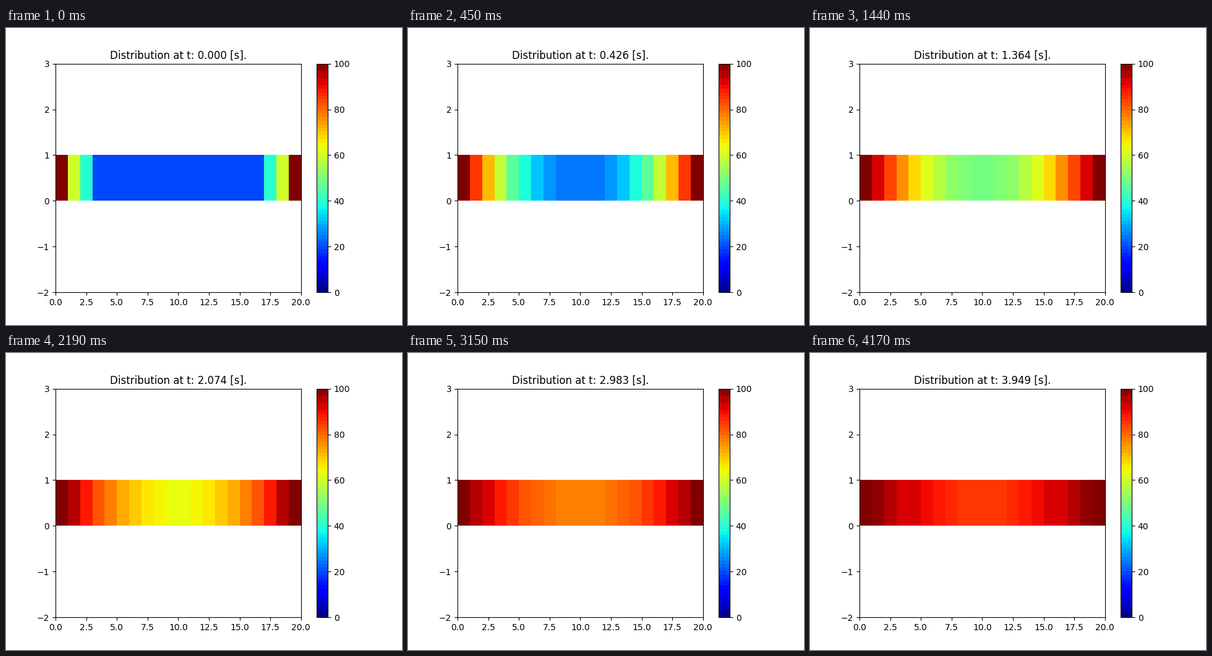
Recreate the animation shown at these times as a matplotlib script. Size 640x480 px, loop 4200 ms.

```python
import matplotlib.pyplot as plt
import numpy as np
from matplotlib.animation import FuncAnimation
from matplotlib.colors import ListedColormap

DIFFUSIVITY = 110
LENGTH = 50
NODES = 20
FRAMES = 140
WARMUP = 2  # steps already taken when the clock reads zero

dx = LENGTH / NODES
dt = 0.5 * dx**2 / DIFFUSIVITY


def solve(steps):
    """Temperatures of a rod with hot ends, one row per time step."""
    u = np.full(NODES, 20.0)
    u[0] = u[-1] = 100
    rows = [u]
    for _ in range(steps):
        w = u.copy()
        w[1:-1] += DIFFUSIVITY * dt / dx**2 * (u[:-2] - 2 * u[1:-1] + u[2:])
        rows.append(w)
        u = w
    return rows


def banded_jet():
    """Jet in flat bands, wider at the two dark ends."""
    colors = plt.get_cmap("jet")(np.arange(256))
    edges = [*range(0, 24, 8), *range(24, 232, 4), *range(232, 257, 8)]
    for lo, hi in zip(edges, edges[1:]):
        colors[lo:hi] = colors[lo:hi].mean(axis=0)
    colors[-1] = plt.get_cmap("jet")(1.0)
    return ListedColormap(colors)


states = solve(FRAMES + WARMUP)

fig, ax = plt.subplots(figsize=(6.4, 4.8), dpi=100)
mesh = ax.pcolormesh([states[WARMUP]], cmap=banded_jet(), vmin=0, vmax=100)
fig.colorbar(mesh, ax=ax)
ax.set_ylim(-2, 3)
title = ax.set_title("")


def update(i):
    mesh.set_array([states[i + WARMUP]])
    title.set_text(f"Distribution at t: {i * dt:.3f} [s].")
    return mesh, title


anim = FuncAnimation(fig, update, frames=FRAMES, interval=30,
                     repeat=True, repeat_delay=0)
plt.show()
```
